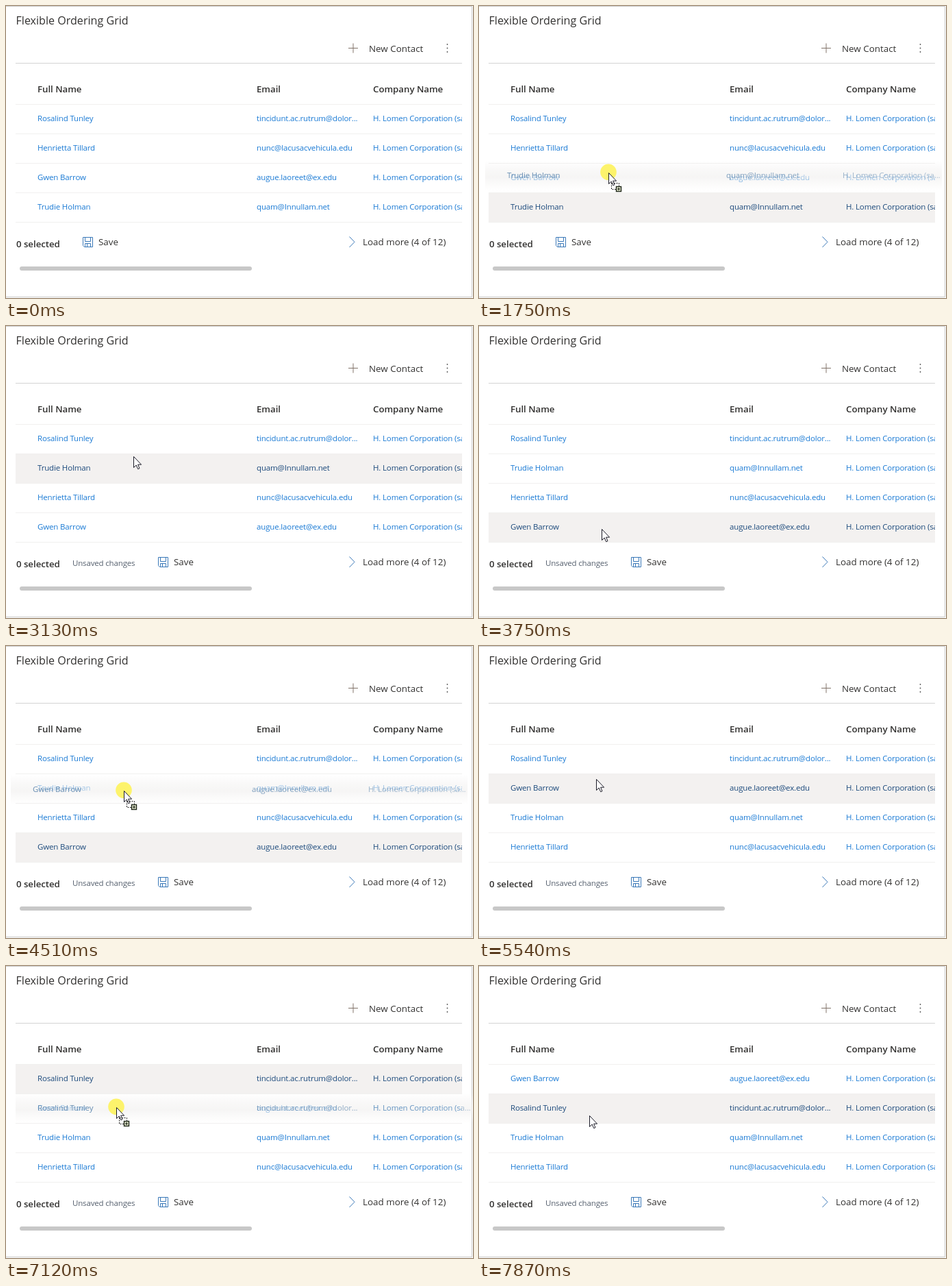
These frames come from a looping animation (682 px wide and 426 px high, 8000 ms). An HTML page:

```html
<!DOCTYPE html>
<html lang="en">
<head>
<meta charset="utf-8">
<title>Flexible Ordering Grid</title>
<style>
  html, body { margin: 0; width: 100%; height: 100%; overflow: hidden; background: #fff; }
  svg { display: block; width: 682px; height: 426px; }
  text { font: 13.4px "Open Sans", "Noto Sans", sans-serif; fill: #323130; white-space: pre; }
  .title { font-size: 16.1px; }
  .bold { font-size: 13.3px; font-weight: 600; letter-spacing: -.05px; }
  .small { font-size: 11.5px; letter-spacing: -.16px; }
  .note { fill: #56606e; }
  .row text { fill: #1a7ad4; }
  .row.hover text { fill: #1c4a7c; }
  .row rect { fill: none; }
  .row.hover rect { fill: #f3f1f0; }
  .ghost text { fill: url(#inkFade); }
  .line { stroke: #f1f0ef; }
  .blue { fill: none; stroke: #3a78b8; }
</style>
</head>
<body>
<svg viewBox="0 0 682 426">
  <defs>
    <clipPath id="view"><rect x="14" y="84" width="652" height="240"/></clipPath>
    <linearGradient id="bandFade" x1="0" y1="0" x2="0" y2="1">
      <stop offset="0" stop-color="#f4f3f2" stop-opacity="0"/>
      <stop offset=".3" stop-color="#f4f3f2" stop-opacity=".55"/>
      <stop offset=".55" stop-color="#f2f1f0" stop-opacity=".7"/>
      <stop offset="1" stop-color="#f4f3f2" stop-opacity="0"/>
    </linearGradient>
    <linearGradient id="inkFade" gradientUnits="userSpaceOnUse" x1="40" y1="0" x2="680" y2="0">
      <stop offset="0" stop-color="#14518c" stop-opacity=".62"/>
      <stop offset=".25" stop-color="#14518c" stop-opacity=".66"/>
      <stop offset="1" stop-color="#14518c" stop-opacity=".32"/>
    </linearGradient>
  </defs>

  <rect width="682" height="426" fill="#fff"/>
  <path d="M0 .5H680.5V424.5H0" fill="none" stroke="#cbcbcb"/>
  <text class="title" x="14.5" y="27">Flexible Ordering Grid</text>
  <path d="M500 61.5H514M507 54.5V68.5" stroke="#82746a" fill="none"/>
  <text x="530" y="67">New Contact</text>
  <g fill="#555"><circle cx="644.5" cy="56" r=".9"/><circle cx="644.5" cy="61.5" r=".9"/><circle cx="644.5" cy="67" r=".9"/></g>
  <path d="M14 83.5H666" stroke="#d4d4d4"/>

  <text class="bold" x="46" y="126">Full Name</text>
  <text class="bold" x="366" y="126">Email</text>
  <text class="bold" x="536" y="126">Company Name</text>
  <g id="rows" clip-path="url(#view)"></g>
  <path class="line" d="M14 143.5H666M14 186.5H666M14 229.5H666M14 272.5H666M14 315.5H666"/>

  <text class="bold" x="15" y="352">0 selected</text>
  <text class="small note" id="note" x="97" y="350">Unsaved changes</text>
  <g id="save">
    <path class="blue" d="M112.5 337.5H126.5V351.5H114.5L112.5 349.5ZM115.5 337.5V343.5H123.5V337.5M115.5 351.5V346.5H123.5V351.5M118.5 347V351"/>
    <text x="135" y="349">Save</text>
  </g>
  <path class="blue" d="M501.5 336.5L509 344.3L501.5 352"/>
  <text x="521" y="349">Load more (4 of 12)</text>
  <rect x="20" y="380" width="339" height="6" rx="3" fill="#c8c8c8"/>

  <g id="ghosts"></g>
  <g id="pointer">
    <circle id="press" cx="0" cy="-.7" r="11.8" fill="#fdf36c"/>
    <path d="M.5 .5V16.5L4.2 13L6.7 18.7L9 17.7L6.6 12.2H11.6Z" fill="#fff" stroke="#1c1c28"/>
    <g id="badge">
      <rect x="4.5" y="15.5" width="11" height="9" fill="none" stroke="#222" stroke-dasharray="2 1.5"/>
      <rect x="11.5" y="20.5" width="7" height="7" fill="#e6ead0" stroke="#1c2416" stroke-width="1.4"/>
      <path d="M15 22V26M13 24H17" stroke="#1c2416" stroke-width="1.2"/>
    </g>
  </g>
</svg>
<script>
const LOOP = 8000, TOP = 143, ROW = 43, STEP = 70;
const COMPANY = "H. Lomen Corporation (sa...";
const people = [
  ["Rosalind Tunley", "tincidunt.ac.rutrum@dolor..."],
  ["Henrietta Tillard", "nunc@lacusacvehicula.edu"],
  ["Gwen Barrow", "augue.laoreet@ex.edu"],
  ["Trudie Holman", "quam@Innullam.net"]
];

// Pointer path: time, x, y
const path = [
  [130, 214, 378], [340, 217, 312], [550, 219, 294], [1010, 219, 294],
  [1350, 194, 294], [1560, 194, 294], [1750, 189, 243], [2170, 188, 202],
  [2300, 188, 202], [2510, 187, 187], [2920, 187, 187], [3130, 186, 190],
  [3470, 182, 240], [3750, 179, 296], [4230, 179, 296], [4510, 172, 211],
  [4790, 171, 190], [5330, 171, 190], [5540, 171, 194], [5800, 171, 194],
  [6360, 161, 163], [6630, 161, 163], [7250, 161, 218], [8000, 161, 218]
];
const drags = [
  { who: 3, press: 1420, lift: 1630, drop: 2710, x: 194, y: 289 },
  { who: 2, press: 4160, lift: 4300, drop: 5120, x: 179, y: 295 },
  { who: 0, press: 6630, lift: 6700, drop: 7450, x: 161, y: 163 }
];
// Row order from each moment on
const orders = [
  [0, [0, 1, 2, 3]], [2780, [0, 3, 1, 2]], [5190, [0, 2, 3, 1]], [7520, [2, 0, 3, 1]]
];

const $ = id => document.getElementById(id);
const show = (el, on) => el.setAttribute("visibility", on ? "inherit" : "hidden");
const move = (el, x, y) => el.setAttribute("transform", `translate(${x} ${y})`);

function add(parent, tag, attrs, text) {
  const el = document.createElementNS("http://www.w3.org/2000/svg", tag);
  for (const key in attrs) el.setAttribute(key, attrs[key]);
  if (text) el.textContent = text;
  return parent.appendChild(el);
}

function makeRow(parent, kind, [name, mail], box) {
  const g = add(parent, "g", { class: kind });
  add(g, "rect", { y: 0, height: ROW, ...box });
  [[46, name], [366, mail], [536, COMPANY]].forEach(([x, s]) =>
    add(g, "text", { class: "small", x, y: 25 }, s));
  return g;
}

const rows = people.map(p => makeRow($("rows"), "row", p, { x: 14, width: 652 }));
const ghosts = people.map(p =>
  makeRow($("ghosts"), "ghost", p, { x: 14, width: 667, fill: "url(#bandFade)" }));

function pointerAt(t) {
  const i = path.findIndex((k, n) => n === path.length - 1 || t < path[n + 1][0]);
  const [t0, x0, y0] = path[i], [t1, x1, y1] = path[Math.min(i + 1, path.length - 1)];
  const n = Math.max(1, Math.round((t1 - t0) / STEP));
  const p = t1 > t0 ? Math.floor((t - t0) / (t1 - t0) * n) / n : 0;
  return [Math.round(x0 + (x1 - x0) * p), Math.round(y0 + (y1 - y0) * p)];
}

function draw(t) {
  const visible = t >= path[0][0];
  const [x, y] = pointerAt(Math.max(t, path[0][0]));
  const order = orders.filter(o => t >= o[0]).pop()[1];
  const drag = drags.find(d => t >= d.press && t < d.drop);
  const lifted = drag && t >= drag.lift;
  const hover = drag ? order.indexOf(drag.who) : visible ? Math.floor((y - TOP) / ROW) : -1;

  order.forEach((who, i) => {
    move(rows[who], 0, TOP + i * ROW);
    rows[who].classList.toggle("hover", i === hover);
  });
  ghosts.forEach((g, who) => {
    const on = lifted && drag.who === who;
    show(g, on);
    if (on) move(g, x - drag.x, TOP + hover * ROW + y - drag.y);
  });

  const dirty = t >= orders[1][0];
  show($("note"), dirty);
  move($("save"), dirty ? 110 : 0, 0);
  show($("pointer"), visible);
  move($("pointer"), x, y);
  show($("press"), drag);
  show($("badge"), lifted);
}

const start = performance.now();
function tick(now) {
  draw(Math.max(0, now - start) % LOOP);
  requestAnimationFrame(tick);
}
draw(0);
requestAnimationFrame(tick);
</script>
</body>
</html>
```
